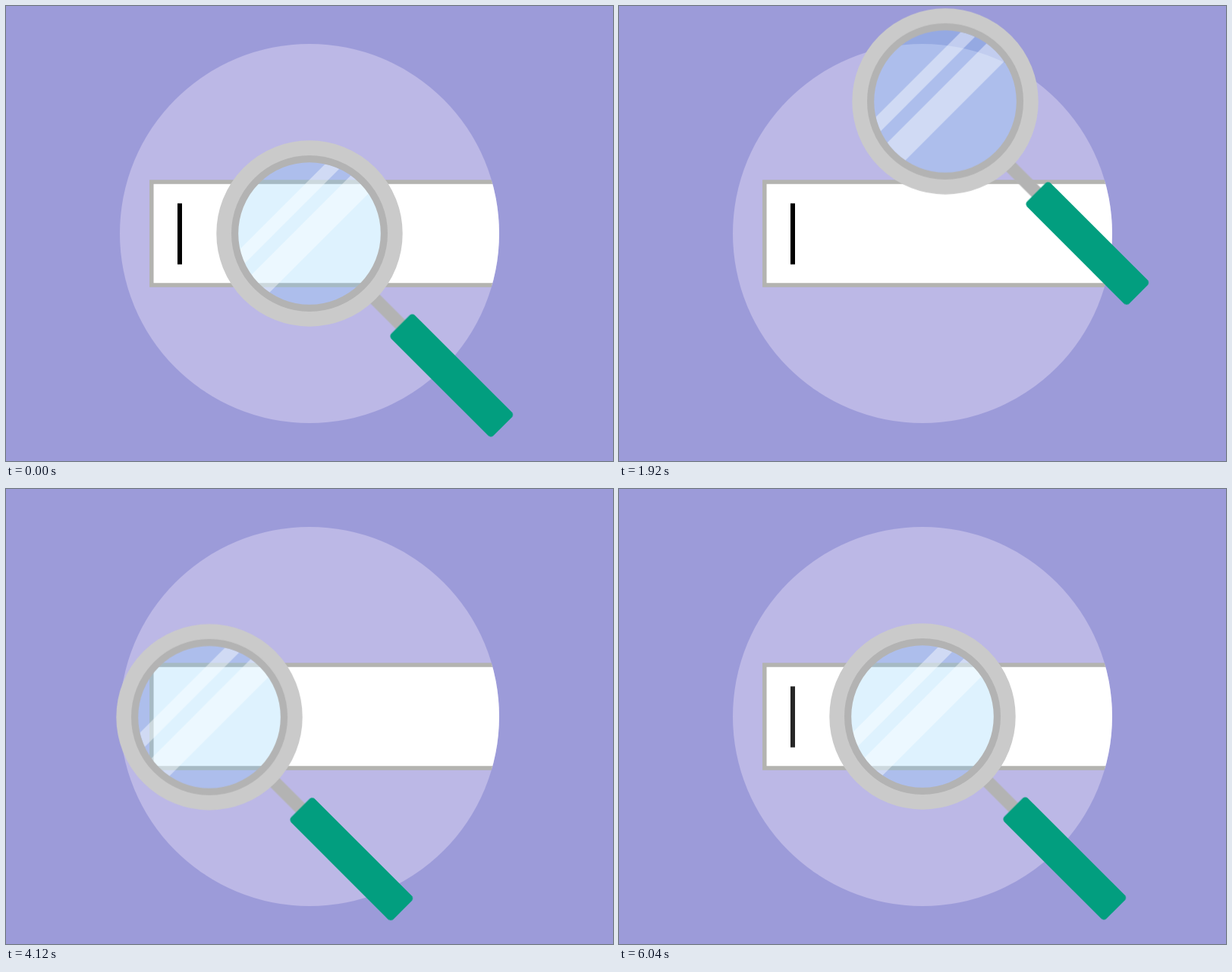
Animation, 800 px wide and 600 px high, one loop 6.08 s. Source, as an HTML page:

```html
<!DOCTYPE html>
<html lang="en">
<head>
<meta charset="utf-8">
<title>Search</title>
<style>
  html, body {
    margin: 0;
    width: 100%;
    height: 100%;
    overflow: hidden;
    background: #9c9bd9;
  }
  svg { display: block; width: 800px; height: 600px; }

  .caret { animation: blink 1520ms infinite cubic-bezier(.333, 0, .667, 1); }
  .glass { animation: roam 6080ms infinite cubic-bezier(.5, 0, .2, 1); }

  @keyframes blink {
    0%, 52.6316% { opacity: 1; }
    63.1579%, 89.4737% { opacity: 0; }
    100% { opacity: 1; }
  }

  /* each move takes 960 ms, with 480 ms rests between moves */
  @keyframes roam {
    0%, 15.7895% { transform: translate(400px, 300px); }
    31.5789%, 39.4737% { transform: translate(430px, 125.8px); }
    55.2632%, 63.1579% { transform: translate(228px, 301px); }
    78.9474%, 100% { transform: translate(400px, 300px); }
  }
</style>
</head>
<body>
<svg viewBox="0 0 800 600">
  <defs>
    <clipPath id="disc"><circle cx="400" cy="300" r="250"/></clipPath>
    <clipPath id="lens"><circle r="94"/></clipPath>
  </defs>

  <circle cx="400" cy="300" r="250" fill="#bcb8e6"/>
  <g clip-path="url(#disc)">
    <rect x="191.8" y="232" width="520" height="136" fill="#fff" stroke="#b3b3b0" stroke-width="5.5"/>
  </g>
  <rect class="caret" x="226" y="260.3" width="6" height="80.4"/>

  <g class="glass">
    <g transform="rotate(45)">
      <rect x="112" y="-8.5" width="62" height="17" fill="#b3b3b3"/>
      <rect x="169.6" y="-22" width="190.4" height="44" rx="5" fill="#029e7f"/>
    </g>
    <circle r="94.5" fill="rgb(133, 207, 251)" fill-opacity=".27"/>
    <g clip-path="url(#lens)">
      <g transform="rotate(-45)" fill="#fff" fill-opacity=".42">
        <rect x="-100" y="-50.2" width="200" height="17.7"/>
        <rect x="-100" y="-15.6" width="200" height="33.3"/>
      </g>
    </g>
    <g fill="none">
      <circle r="111.35" stroke="#cacaca" stroke-width="22.7"/>
      <circle r="98.4" stroke="#b3b3b3" stroke-width="9.2"/>
    </g>
  </g>
</svg>
</body>
</html>
```
